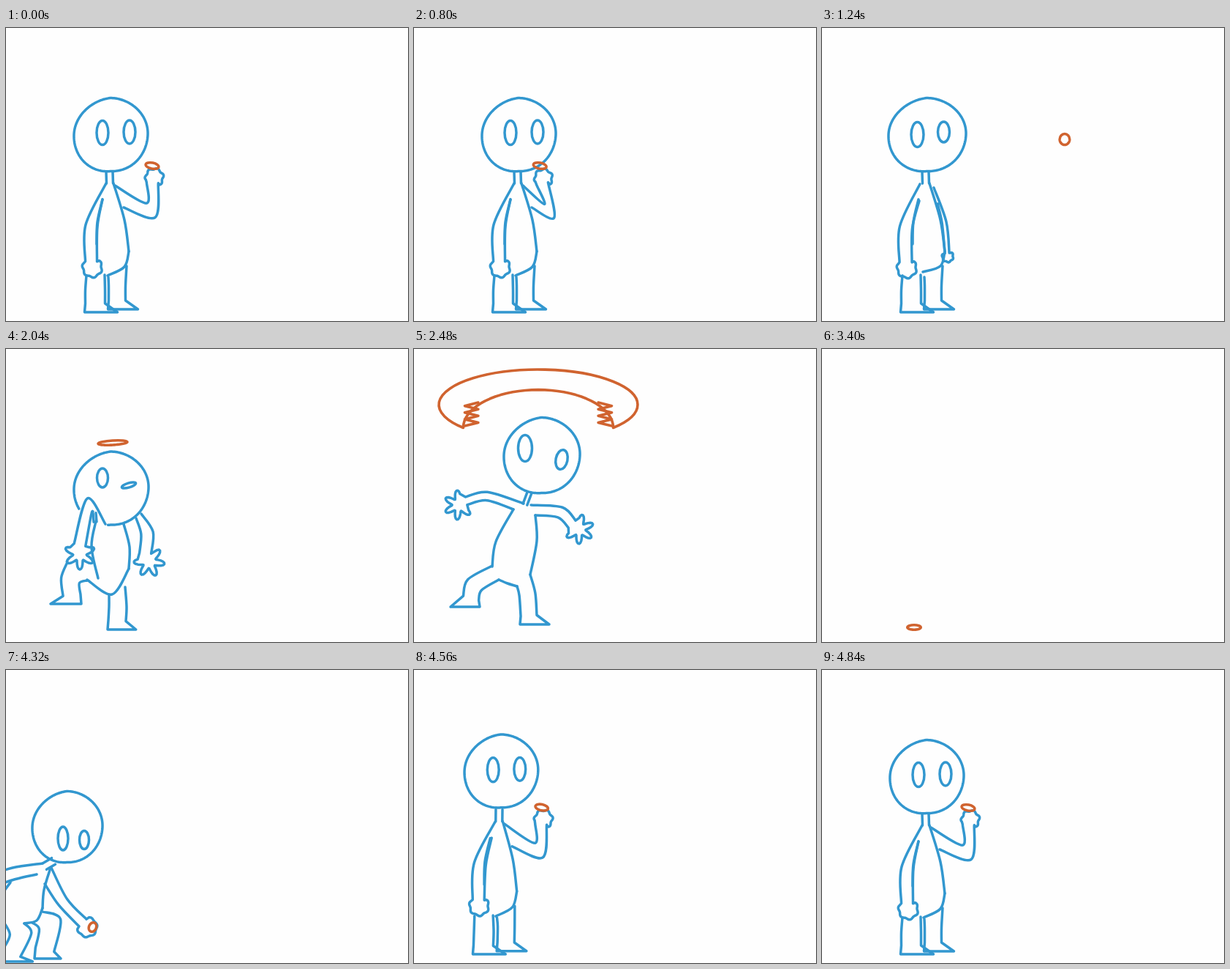
Animation, 550 px wide and 400 px high, one loop 5000 ms. Source, as an HTML page with a canvas:

```html
<!DOCTYPE html>
<html lang="en">
<head>
<meta charset="utf-8">
<title>Ring toss</title>
<style>
html, body { margin: 0; width: 100%; height: 100%; overflow: hidden; background: #fefefe; }
canvas { display: block; }
</style>
</head>
<body>
<canvas id="stage" width="550" height="400"></canvas>
<script>
const ctx = document.getElementById('stage').getContext('2d');
const BLUE = '#3297cf', ORANGE = '#d0632f', LOOP = 5000, STEP = 40, FLOOR = 388;
const { PI, sin, cos, abs, max, min, hypot } = Math;
const rad = deg => deg * PI / 180;

// ---------- parts: every two-number array is a point ----------
const oval = (x, y, rx, ry, rot = 0) => ({ at: [x, y], rx, ry, rot });
// a and b are the two ends of the outline at the trunk
const arm = (a, b, joint, hand, w, angle, size, spread) => ({ a, b, joint, hand, w, angle, size, spread });
const leg = (a, b, joint, ankle, w, toe) => ({ a, b, joint, ankle, w, toe });
const ring = (x, y, rx, ry, rot = 0, bite = 0) => ({ at: [x, y], rx, ry, rot, bite });

const stand = {
  head: oval(143.5, 145.5, 50.5, 50), gap: 0,
  eyes: [oval(132, 143, 8, 16.5), oval(169, 142, 8, 16)],
  neck: { top: [141.5, 196], end: [142, 212], w: 4.5 },
  side: [[132, 234], [125, 265], [124, 295]],
  body: [[147, 212], [162, 262], [168, 305]],
  seat: [[168, 305], [162, 326], [139, 338]],
  arms: [
    arm([137, 212], [132, 234], [117, 270], [118, 327], 8, 80, 14, 0.25),
    arm([161, 245], [149, 215], [198, 249], [203, 204], 8, -70, 13, 0.3)],
  legs: [
    leg([110, 338], [135, 337], [122, 358], [122, 376], 13.5, 1),
    leg([140, 340], [165, 325], [152, 352], [152, 372], 11.5, 1)]
};

const wait = {
  ...stand,
  head: oval(144, 145.5, 53, 50),
  eyes: [oval(130.5, 145.5, 8.5, 17), oval(166.5, 142, 8, 14)],
  seat: [[168, 305], [162, 325], [138, 333]],
  arms: [
    arm([134, 213], [133, 236], [115, 272], [116, 328], 8.5, 80, 14, 0.25),
    arm([158, 240], [153, 218], [167, 265], [172, 312], 3, 80, 8, 0.25)]
};

const cower = {
  head: oval(144, 190, 51, 50), gap: 1,
  eyes: [oval(132, 176, 7.5, 13), oval(168, 186, 10, 3, -0.3)],
  neck: { top: [121, 224], end: [122, 236], w: 2 },
  side: [[123, 235], [117, 270], [126, 313]],
  body: [[161, 239], [169, 270], [168, 300]],
  seat: [[168, 300], [145, 335], [111, 315]],
  arms: [
    arm([136, 239], [119, 222], [114, 215], [101, 280], 8, 90, 21, 1),
    arm([178, 231], [185, 225], [193, 251], [196, 290], 8, 65, 21, 1)],
  legs: [
    leg([84, 291], [111, 316], [88, 316], [90, 336], 12, -1),
    leg([141, 336], [163, 325], [153, 352], [152, 371], 12, 0.8)]
};

const alarm = {
  head: oval(175, 145, 52, 51.5), gap: 0,
  eyes: [oval(152, 135.5, 9.5, 18), oval(202, 151, 8, 13.5, 0.2)],
  neck: { top: [158, 196], end: [152, 212], w: 3 },
  side: [[136, 219], [112, 263], [107, 297]],
  body: [[166, 227], [168, 262], [159, 308]],
  seat: [[141, 324], [128, 320], [116, 315]],
  arms: [
    arm([150, 211], [136, 219], [100, 201], [61, 213], 5.5, 152, 20, 1),
    arm([166, 227], [160, 213], [200, 223], [226, 246], 7, 35, 20, 1)],
  legs: [
    leg([107, 296], [116, 315], [83, 322], [78, 340], 11, -1),
    leg([141, 324], [159, 308], [155, 335], [157, 364], 11, 1)]
};

const stoop = {
  head: oval(84, 214, 48, 48.5), gap: 0,
  eyes: [oval(78, 230, 7, 16), oval(107, 232, 6.5, 12.5)],
  neck: { top: [65, 261], end: [53, 268], w: 5 },
  side: [[6, 290], [-6, 310], [-5, 340]],
  body: [[61, 270], [52, 300], [50, 325]],
  seat: [[50, 325], [42, 342], [25, 346]],
  arms: [
    arm([50, 264], [42, 279], [10, 278], [-30, 292], 8, 160, 12, 0.2),
    arm([53, 292], [62, 270], [78, 317], [111, 351], 7, 45, 14, 0.2)],
  legs: [
    leg([-6, 340], [25, 346], [20, 360], [8, 386], 13, 0.9),
    leg([36, 345], [50, 330], [60, 347], [53, 382], 13, 0.5)]
};

// ---------- pose tools ----------
const isPoint = v => Array.isArray(v) && v.length === 2 && typeof v[0] === 'number';

function mapTree(f, a, b) {
  if (Array.isArray(a)) return a.map((v, i) => isPoint(a) ? f(v, b[i]) : mapTree(f, v, b[i]));
  if (typeof a === 'object')
    return Object.fromEntries(Object.keys(a).map(k => [k, mapTree(f, a[k], b[k])]));
  return f(a, b);
}
const mix = (a, b, u) => mapTree((x, y) => x + (y - x) * u, a, b);

// shift every point and stretch upward from the floor
function shift(v, dx, dy, stretch = 1) {
  if (isPoint(v)) return [v[0] + dx, FLOOR + (v[1] - FLOOR) * stretch + dy];
  if (Array.isArray(v)) return v.map(p => shift(p, dx, dy, stretch));
  if (typeof v !== 'object') return v;
  return Object.fromEntries(Object.keys(v).map(k => [k, shift(v[k], dx, dy, stretch)]));
}

const withArm = a => ({ ...stand, arms: [stand.arms[0], a] });
const windup = withArm(arm([161, 245], [149, 215], [184, 250], [175, 205], 8, -80, 13, 0.3));
const fling = withArm(arm([158, 240], [150, 215], [195, 215], [236, 190], 8, -25, 13, 0.5));
const watch = { ...wait, eyes: shift(wait.eyes, 3, -2) };
const reach = { ...shift(stoop, 6, 22), legs: stoop.legs };

// ---------- timelines ----------
const actor = [
  [0, stand], [600, stand], [840, windup], [960, windup], [1040, fling], [1080, fling],
  [1200, wait], [1240, wait], [1440, watch], [1640, wait], [1840, shift(wait, 0, 0, 1.03)],
  [2040, cower], [2080, cower], [2280, alarm], [2360, shift(alarm, 0, 0, 1.02)],
  [2480, alarm], [2800, alarm],
  [3960, shift(stoop, -140, 0)], [4080, shift(stoop, -80, -10)], [4160, shift(stoop, -20, 4)],
  [4240, reach], [4320, stoop], [4600, shift(stand, -22, 0, 1.05)], [4840, stand], [5000, stand]
];

const held = ring(200, 188, 9, 4, 0.2), drawn = ring(170, 188, 9, 4, 0.2);
const jaws = ring(170, 76, 136, 48, 0, 1), rest = ring(126, 380, 9.2, 3.2);
const prop = [
  [0, held], [600, held], [840, drawn], [960, drawn], [1040, ring(241, 177, 8, 6)],
  [1160, ring(305, 160, 7.5, 7.5)], [1240, ring(332, 152, 6.8, 7.5)], [1400, ring(460, 118, 8, 6)],
  [1520, ring(562, 96, 10, 5)], [1600, ring(540, 88, 11, 5)], [1720, ring(376, 88, 12, 4)],
  [1880, ring(245, 104, 17, 4)], [2040, ring(146, 128, 20, 3, -0.06)],
  [2200, ring(160, 50, 88, 18)], [2280, ring(166, 40, 132, 32, 0, 0.1)],
  [2360, shift(jaws, 0, -10)], [2480, jaws], [2560, shift(jaws, 0, -20)],
  [2680, ring(150, 250, 110, 48, 0, 1)], [2760, ring(132, 340, 48, 26, 0, 0.4)],
  [2840, ring(126, 374.7, 9.2, 8.5)], [3400, rest], [4200, rest],
  [4320, ring(118.5, 351, 5, 6.5, 0.4)], [4600, ring(178, 178, 9, 4, 0.2)], [4840, held], [5000, held]
];

function poseAt(keys, t, linear) {
  let i = 0;
  while (i < keys.length - 2 && keys[i + 1][0] <= t) i++;
  const [t0, a] = keys[i], [t1, b] = keys[i + 1];
  const u = (t - t0) / (t1 - t0);
  return mix(a, b, linear ? u : u * u * (3 - 2 * u));
}

// the ring settles like a dropped coin
function settle(t) {
  const u = (t - 2840) / 560, ry = 3.2 + 5.3 * (1 - u) * abs(cos(u * 5 * PI));
  return ring(126, 383.2 - ry, 9.2, ry, 0.15 * (1 - u) * sin(u * 20));
}

function ringAt(t) {
  if (t > 2840 && t < 3400) return settle(t);
  return poseAt(prop, t, t >= 1040 && t < 2040);
}

// ---------- drawing ----------
// smooth curve through a few points, joined to the current path
function curve(pts) {
  ctx.lineTo(...pts[0]);
  for (let i = 0; i < pts.length - 1; i++) {
    const p = pts[i], q = pts[i + 1], o = pts[i - 1] || p, r = pts[i + 2] || q;
    ctx.bezierCurveTo(p[0] + (q[0] - o[0]) / 6, p[1] + (q[1] - o[1]) / 6,
      q[0] - (r[0] - p[0]) / 6, q[1] - (r[1] - p[1]) / 6, q[0], q[1]);
  }
}

function outline(build) {
  ctx.beginPath();
  build();
  ctx.stroke();
}

function normal(p, q) {
  const l = hypot(q[0] - p[0], q[1] - p[1]) || 1;
  return [(p[1] - q[1]) / l, (q[0] - p[0]) / l];
}
const offset = (p, n, d) => [p[0] + n[0] * d, p[1] + n[1] * d];

// both edges of a bent tube, each from trunk to end
function edges({ a, b, joint, w }, end) {
  const n1 = normal(mix(a, b, 0.5), joint), n2 = normal(joint, end);
  const s = [n1[0] + n2[0], n1[1] + n2[1]], l = hypot(...s) || 1;
  const m = [s[0] / l, s[1] / l], d = w / max(0.7, l / 2);
  return [
    [a, offset(joint, m, d), offset(end, n2, w)],
    [b, offset(joint, m, -d), offset(end, n2, -w)]];
}

function drawArm(limb) {
  const { hand, angle, size, spread } = limb, h = rad(angle);
  const wrist = offset(hand, [cos(h), sin(h)], -0.6 * size);
  const [near, far] = edges(limb, wrist);
  outline(() => {
    curve(near);
    for (let d = 125; d >= -125; d -= 5) {
      const r = size * (1 - spread * 0.28 * (1 - cos(6.4 * rad(d))));
      ctx.lineTo(hand[0] + r * cos(h + rad(d)), hand[1] + r * sin(h + rad(d)));
    }
    curve(far.reverse());
  });
}

function drawLeg(limb) {
  const { ankle: [x, y], w, toe } = limb;
  const [left, right] = edges(limb, limb.ankle);
  outline(() => {
    curve(left);
    ctx.lineTo(x - w - 1 - 16 * max(0, -toe), y + 12);
    ctx.lineTo(x + w + 1 + 16 * max(0, toe), y + 12);
    curve(right.reverse());
  });
}

// slightly egg-shaped, open at the lower left where a shoulder covers it
function drawHead({ at: [x, y], rx, ry }, gap) {
  outline(() => {
    for (let d = 26 * gap; d <= 360 - 26 * gap; d += 2) {
      const a = rad(121 + d), s = sin(2 * a);
      const r = 1 + 0.03 * abs(s) * sin(a) - 0.018 * s;
      ctx.lineTo(x + rx * r * cos(a), y + ry * r * sin(a));
    }
    if (gap < 0.05) ctx.closePath();
  });
}

function drawActor(p) {
  ctx.strokeStyle = BLUE;
  ctx.lineWidth = 3.5;
  drawHead(p.head, p.gap);
  for (const { at, rx, ry, rot } of p.eyes) outline(() => ctx.ellipse(...at, rx, ry, rot, 0, 2 * PI));
  const { top, end, w } = p.neck, n = normal(top, end);
  for (const d of [w, -w]) outline(() => curve([offset(top, n, d), offset(end, n, d)]));
  for (const line of [p.side, p.body, p.seat]) outline(() => curve(line));
  p.legs.forEach(drawLeg);
  p.arms.forEach(drawArm);
}

// an oval whose lower edge folds upward into jaws as bite grows
function drawRing({ at, rx, ry, rot, bite }) {
  const tip = rad(41 * bite), half = rx * cos(tip), base = ry * sin(tip);
  const fold = ry * (1 - 2.08 * bite);
  ctx.strokeStyle = ORANGE;
  ctx.lineWidth = 3.6;
  ctx.save();
  ctx.translate(...at);
  ctx.rotate(rot);
  outline(() => {
    ctx.ellipse(0, 0, rx, ry, 0, PI - tip, 2 * PI + tip);
    for (let d = 0; d <= 180; d += 5) ctx.lineTo(half * cos(rad(d)), base + fold * sin(rad(d)));
    ctx.closePath();
  });
  if (bite > 0.05) for (const s of [-1, 1]) outline(() => {
    for (let i = 0; i < 8; i++)
      ctx.lineTo(s * half * (i % 2 ? 0.98 : 1 - 0.2 * bite), ry * bite * (-0.06 + i * 0.095));
  });
  ctx.restore();
}

function render(t) {
  const loop = ringAt(t);
  ctx.fillStyle = '#fefefe';
  ctx.fillRect(0, 0, 550, 400);
  ctx.lineCap = ctx.lineJoin = 'round';
  if (t < 2800 || t >= 4000) {
    // the descending jaws swallow everything above them
    const cut = t > 2400 && t < 2800 ? loop.at[1] - 20 : 0;
    ctx.save();
    ctx.beginPath();
    ctx.rect(0, cut, 550, 400);
    ctx.clip();
    drawActor(poseAt(actor, t));
    ctx.restore();
  }
  drawRing(loop);
}

const start = performance.now();
function tick(now) {
  const t = max(0, now - start) % LOOP;
  render(Math.floor(t / STEP) * STEP);
  requestAnimationFrame(tick);
}
render(0);
requestAnimationFrame(tick);
</script>
</body>
</html>
```
